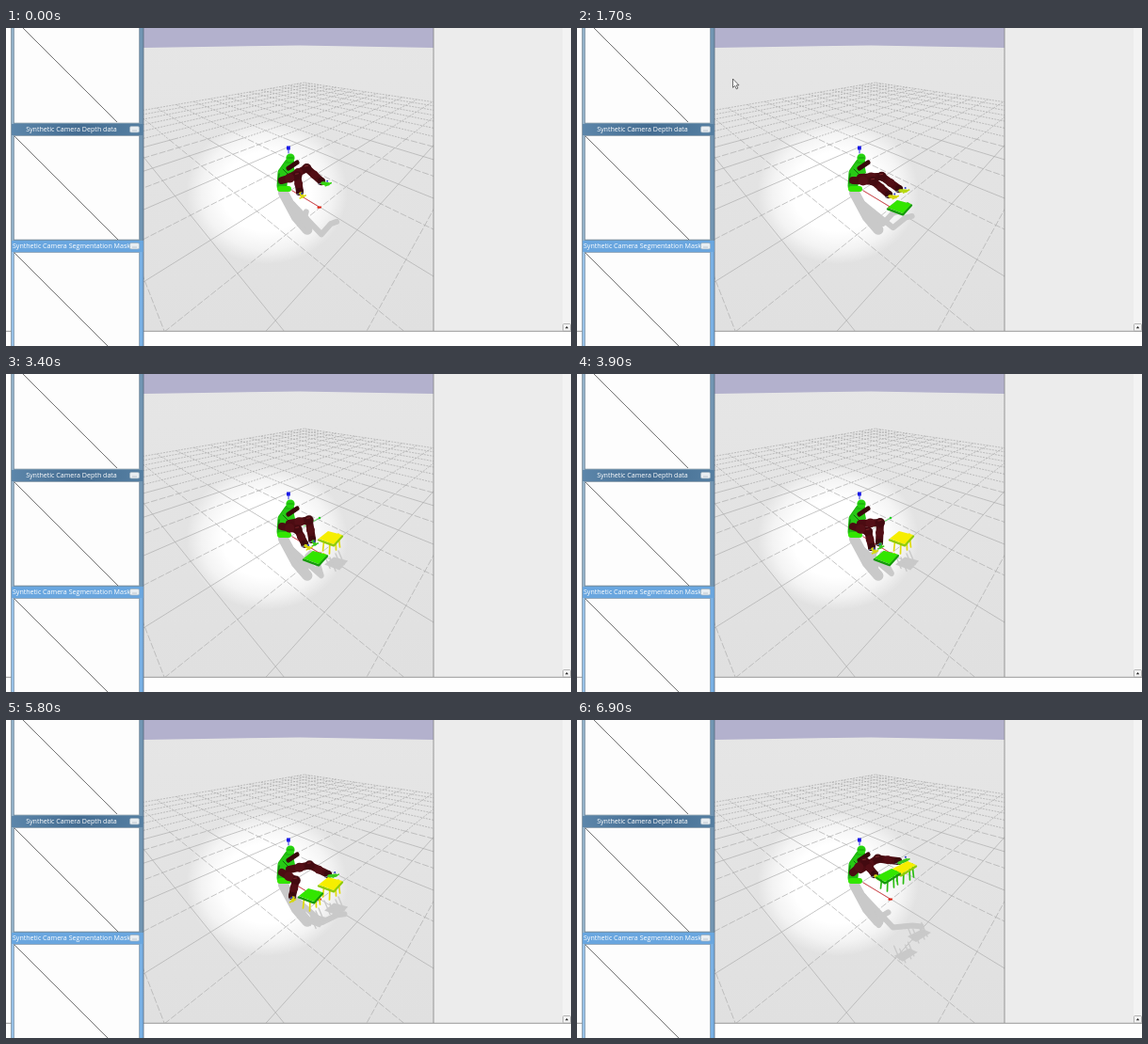
Write an HTML page that moves like this. It is 600 px wide and 338 px high and loops after 7 s.

```html
<!DOCTYPE html>
<html lang="en">
<head>
<meta charset="utf-8">
<title>Simulation viewer</title>
<style>
html, body { margin: 0; width: 100%; height: 100%; overflow: hidden; background: #fff; }
svg { display: block; width: 100vw; height: 100vh; }
text { font-family: "Open Sans", "Noto Sans", sans-serif; font-size: 7.1px; fill: #fff; }
</style>
</head>
<body>
<svg viewBox="0 0 600 338" preserveAspectRatio="none">
  <defs>
    <linearGradient id="floor" x1="0" y1="0" x2="0" y2="1">
      <stop offset="0" stop-color="#e6e6e6"/><stop offset="1" stop-color="#e0e0e0"/>
    </linearGradient>
    <radialGradient id="spot">
      <stop offset=".55" stop-color="#fff"/><stop offset=".8" stop-color="#fff" stop-opacity=".6"/>
      <stop offset="1" stop-color="#fff" stop-opacity="0"/>
    </radialGradient>
    <linearGradient id="dim" x1="0" y1="0" x2="1" y2="0">
      <stop offset="0" stop-color="#5c86aa"/><stop offset=".5" stop-color="#456d92"/><stop offset="1" stop-color="#557fa2"/>
    </linearGradient>
    <clipPath id="view"><rect x="146" width="308" height="322"/></clipPath>
  </defs>
  <rect width="600" height="338" fill="#fefefe"/>
  <rect x="454" width="137" height="322" fill="#ececec"/>
  <rect x="591" width="9" height="322" fill="#f3f3f3"/>
  <g clip-path="url(#view)">
    <rect x="146" width="308" height="322" fill="url(#floor)"/>
    <path d="M146 0H454V21L312 18.500L146 21Z" fill="#b3b1cd"/>
    <ellipse cx="277" cy="174" rx="86" ry="77" fill="url(#spot)"/>
    <g id="grid"></g>
    <g id="scene" stroke-linejoin="round" stroke-linecap="round"></g>
  </g>
  <path d="M454 0V322M0 322.300H600" stroke="#808080" stroke-width=".8" fill="none"/>
  <rect x="591.500" y="314.500" width="8" height="7.500" rx="1" fill="#f4f4f4" stroke="#999" stroke-width=".7"/>
  <path d="M593.800 319.200L595.500 317L597.200 319.200Z" fill="#222"/>
  <g id="windows"></g>
  <path id="cursor" d="M165.500 54V63.300L167.700 61.400L169.300 64.800L170.900 64L169.300 60.800H172Z" fill="#fff" stroke="#333" stroke-width=".7"/>
</svg>
<script>
const $ = id => document.getElementById(id);
const mix = (a, b, k) => a + (b - a) * k;
const mixPt = (p, q, k) => p.map((v, i) => mix(v, q[i], k));
const add = ([x, y], dx, dy) => [x + dx, y + dy];
const ramp = (t, from, to) => {
  const k = Math.max(0, Math.min(1, (t - from) / (to - from)));
  return k * k * (3 - 2 * k);
};
const list = pts => pts.map(p => p.map(v => v.toFixed(2))).join(' ');
const line = (pts, color, width, dash = '') =>
  `<polyline points="${list(pts)}" fill="none" stroke="${color}" stroke-width="${width}" stroke-dasharray="${dash}"/>`;
const poly = (pts, fill) => `<polygon points="${list(pts)}" fill="${fill}"/>`;
const dot = ([x, y], r, fill) => `<circle cx="${x.toFixed(2)}" cy="${y.toFixed(2)}" r="${r}" fill="${fill}"/>`;
const box = (x, y, w, h, fill, extra = '') => `<rect x="${x}" y="${y}" width="${w}" height="${h}" fill="${fill}" ${extra}/>`;

// Floor grid with two vanishing points on the horizon
const EDGE = 12, STEP_U = .1083, STEP_V = .1288;
function project(u, v) {
  const a = u * STEP_U, b = v * STEP_V, w = 1 + a + b;
  return [(303 + 50 * a + 550 * b) / w, (172 + 18 * (a + b)) / w];
}
function drawGrid() {
  let out = '';
  const ruler = (i, own, other, at) => {
    const depth = w => at(Math.min(EDGE, (w - 1 - i * own) / other));
    out += line([depth(.42), depth(1.55)], '#aeaeae', .7, i % 2 ? '7 2' : '');
    out += line([depth(1.55), at(EDGE)], '#a9a9a9', .7, '2 1.2');
  };
  for (let i = -EDGE; i <= EDGE; i++) {
    ruler(i, STEP_U, STEP_V, s => project(i, s));
    ruler(i, STEP_V, STEP_U, s => project(s, i));
  }
  $('grid').innerHTML = out;
}

// One preview window: title bar at y, white pane with a diagonal below it
function previewWindow(y, title, bar, border, startX) {
  const pane = y + 12.5, top = Math.max(0, y + 13), reach = Math.min(110, 100 + Math.max(0, y) * .1, 338 - top);
  return box(5.5, y, 140.5, 124, border) +
    line([[5.5, y], [5.5, y + 124]], '#7b8b99', .7) + line([[146, y], [146, y + 124]], '#56697b', .8) +
    line([[7, y], [7, y + 124]], '#c5d8e8', .8) + box(6, y, 139.5, 12, bar) +
    `<text x="69.500" y="${y + 8.4}" text-anchor="middle">${title}</text>` +
    box(131.5, y + 2.5, 10, 6.5, '#e9eef2', 'rx="1.5" stroke="#9db0bf" stroke-width=".7"') +
    line([[134, y + 7], [139, y + 7]], '#b5bec6', .8) +
    box(8.5, pane, 133, 110.5, '#fdfdfd', 'stroke="#7a8c9c" stroke-width=".6"') +
    line([[startX, top], [startX + reach, top + reach]], '#444', .75);
}
function drawWindows() {
  $('windows').innerHTML =
    previewWindow(-22, '', '#456d92', '#7195b2', 18) +
    previewWindow(102, 'Synthetic Camera Depth data', 'url(#dim)', '#7195b2', 9) +
    previewWindow(226, 'Synthetic Camera Segmentation Mask', '#69a6df', '#78b0e4', 9);
}

const GREEN = '#33e600', DEEP = '#169a0c', YELLOW = '#f6ee00', RED = '#4b0c12', SHADE = '#c9c9c9';
const HIP_FAR = [301, 159], HIP_NEAR = [293, 162];

// Ankle positions over time; knees and toes follow from them
const poses = [
  { t: 0, far: [335, 163], near: [312, 174] },
  { t: 1100, far: [342, 171], near: [331, 177] },
  { t: 1700, far: [342, 171], near: [331, 177] },
  { t: 2700, far: [332, 171], near: [324, 175] },
  { t: 3900, far: [321, 179], near: [313, 184] },
  { t: 4800, far: [319, 176], near: [311, 185] },
  { t: 5800, far: [342, 164], near: [304, 187] },
  { t: 6900, far: [341, 150], near: [316, 164] }
];
function ankles(t) {
  const i = Math.max(1, poses.findIndex(p => p.t >= t)), a = poses[i - 1], b = poses[i];
  const k = ramp(t, a.t, b.t);
  return [mixPt(a.far, b.far, k), mixPt(a.near, b.near, k)];
}
function bend(hip, ankle, bone) {
  const dx = ankle[0] - hip[0], dy = ankle[1] - hip[1], d = Math.hypot(dx, dy);
  const l = Math.max(bone, d * .53), out = Math.sqrt(l * l - d * d / 4) / d;
  const knee = add(mixPt(hip, ankle, .5), dy * out, -dx * out);
  const s = 7 / Math.hypot(ankle[0] - knee[0], ankle[1] - knee[1]);
  const toe = add(ankle, (ankle[0] - knee[0]) * s + 2, (ankle[1] - knee[1]) * s - 2);
  return [hip, knee, ankle, toe];
}

// A point h above the floor casts its shadow down and to the right
const cast = ([x, y], h) => [x + h * .47, y + h * 2.12];
const castLeg = leg => leg.slice(1).map(p => cast(p, Math.max(0, (188 - p[1]) * .85)));
const castBody = p => cast(p, 174 - p[1]);

function drawLeg([hip, knee, ankle, toe], foot) {
  return line([hip, knee, ankle], RED, 8) + dot(knee, 5, '#430a10') + dot(ankle, 4, '#3c090e') +
    dot(mixPt(hip, knee, .5), 5, '#540f16') + dot(mixPt(knee, ankle, .5), 4.4, '#520e15') +
    line([add(knee, -2, -2), add(knee, 1, -2.5)], '#7a2528', 1) +
    line([add(ankle, -3, 3), add(ankle, 3, 1)], '#6f7f96', 1.2) +
    line([add(ankle, 1, 2), toe], foot, 3.4) + line([add(toe, -3, 2), add(toe, 3, -1)], foot, 1.6) +
    dot(add(toe, -1, -3), 1, '#2438c8');
}

// A stool lies flat, grows its legs, and is raised at the end of the loop
function makeStool(t, flat, grown, raised, start, height) {
  const grow = ramp(t, start, start + 1000), lift = ramp(t, 5900, 6900);
  const at = mixPt(mixPt(flat, grown, grow), raised, lift);
  const corner = (x, y) => add(at, x, y);
  return {
    legs: 13 * grow, h: mix(13 * grow, height, lift),
    top: [corner(-12, 1), corner(mix(-2, 4, lift), -7), corner(13, -3), corner(mix(4, -3, lift), 7)],
    feet: [[-6, 5], [0, 8], [6, 4], [9, 1]].map(([x, y]) => corner(x, y))
  };
}
function drawStool(s, top, edge, leg) {
  const [left, , right, front] = s.top;
  return s.feet.map((p, i) => line([add(p, 0, -5), add(p, i - 1.5, s.legs - 4)], leg, 1.7)).join('') +
    line([left, front, right].map(p => add(p, 0, 1.4)), edge, 2.4) + poly(s.top, top);
}
function stoolShadow(s) {
  return poly(s.top.map(p => cast(p, s.h)), SHADE) +
    s.feet.map(p => line([cast(p, s.h), cast(add(p, 0, s.legs), s.h - s.legs)], SHADE, 1.4)).join('');
}

function drawBody() {
  const head = [302, 138];
  return line([[300, 133], [300, 127]], '#2c35d8', 1) + box(298, 125.5, 3.8, 4, '#1717e8') +
    line([[301, 144], [294, 154], [293, 168]], '#1fb90f', 11) + line([[291, 171], [300, 171]], GREEN, 6) +
    poly([[289, 153], [296, 144], [305, 144], [307, 154], [298, 160], [289, 160]], '#27c915') +
    line([[294, 150], [300, 156]], '#0c7009', 1) + line([[290, 155], [289, 165]], '#0f850a', 1.4) +
    dot(head, 4.6, '#25d40e') + line([add(head, -3, 0), add(head, 3, 0)], DEEP, 1.2) +
    line([[300, 149], [309, 143]], '#38070b', 5);
}

function drawScene(t) {
  const [farAnkle, nearAnkle] = ankles(t);
  const far = bend(HIP_FAR, farAnkle, 21), near = bend(HIP_NEAR, nearAnkle, 17);
  const a = makeStool(t, [342, 190], [344, 174], [347, 157], 1700, 34);
  const b = makeStool(t, [328, 195], [323, 186], [330, 165], 3800, 40);
  const showA = t >= 900, second = t >= 3100;

  let out = line([[294, 173], [297, 150], [303, 138]].map(castBody), SHADE, 11);
  for (const leg of [far, near]) out += line([castBody([299, 162]), ...castLeg(leg)], SHADE, 6);
  if (showA) out += stoolShadow(a);
  if (second) out += stoolShadow(b);

  out += line([[304, 173], [333, 190.5]], '#d8282e', .8) + line([[331.5, 190.8], [334, 190.5]], '#e02010', 2);
  if (t > 3000 && t < 5300) out += line([[316, 162], [333, 153]], '#38d83c', .8) + dot([333, 153], 1.3, '#21d421');
  out += drawBody();

  const legFar = drawLeg(far, second ? '#3bc81c' : showA ? '#b7d810' : '#35d512');
  const legNear = drawLeg(near, '#d6d80c');
  if (!second) {
    const stool = showA ? drawStool(a, GREEN, a.legs > 1 ? '#dfe000' : DEEP, '#25b90e') : '';
    out += a.legs > 1 ? legFar + legNear + stool : stool + legFar + legNear;
  } else {
    const raised = t > 6300, leg = raised ? '#2bbd12' : '#e0db0b';
    out += legFar + drawStool(a, YELLOW, '#8fcb08', leg) + legNear + drawStool(b, GREEN, DEEP, leg);
  }

  $('scene').innerHTML = out;
  $('cursor').style.display = showA && t < 2300 ? '' : 'none';
}

drawGrid();
drawWindows();
let shown = -1;
function tick() {
  const t = Math.floor(performance.now() % 7000 / 100) * 100;
  if (t !== shown) drawScene(shown = t);
  requestAnimationFrame(tick);
}
tick();
</script>
</body>
</html>
```
